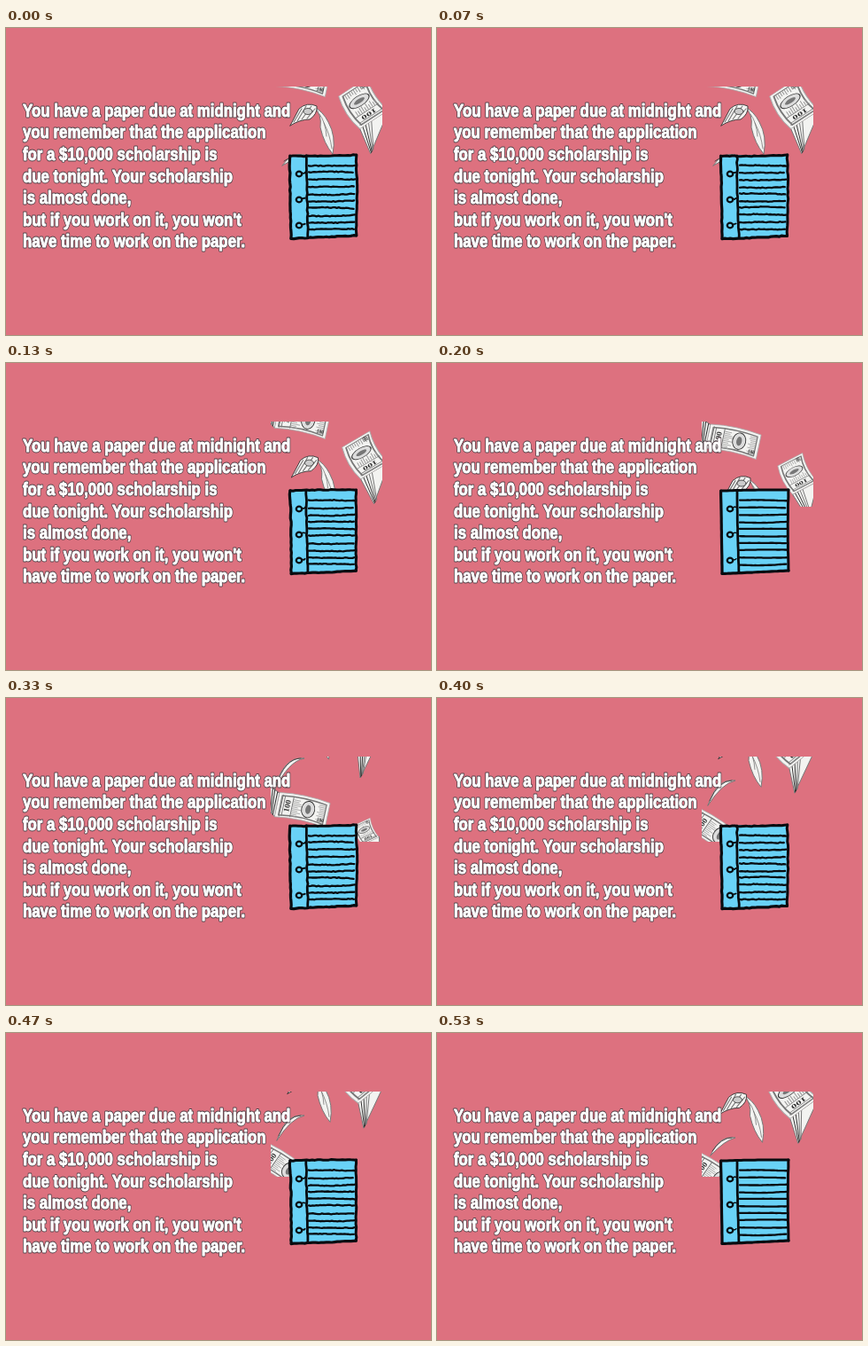
Recreate the animation shown at these times as an HTML page with a canvas. Size 480 by 346 pixels, loop 590 ms.

```html
<!DOCTYPE html>
<html lang="en">
<head>
<meta charset="utf-8">
<title>Paper or scholarship</title>
<style>
  html, body { margin: 0; width: 100%; height: 100%; overflow: hidden; background: #dd717f; }
  canvas { display: block; }
</style>
</head>
<body>
<canvas id="stage" width="480" height="346"></canvas>
<script>
const ctx = document.getElementById('stage').getContext('2d');
const LOOP = 590;
const POSE_STARTS = Array.from({ length: 9 }, (_, i) => Math.round(i * 20 / 3) * 10);
const FALL_STEPS = 6;       // the money moves on two of every three poses
const NOTEBOOK_CYCLE = 5;   // the notebook is redrawn on every pose
const INK = '#333', GREY = '#777', WHITE = '#f3f3f1';

const LINES = [
  'You have a paper due at midnight and',
  'you remember that the application',
  'for a $10,000 scholarship is',
  'due tonight. Your scholarship',
  'is almost done,',
  "but if you work on it, you won't",
  'have time to work on the paper.'
];

const clamp = v => Math.min(1, Math.max(0, v));
const random = seed => {
  const v = Math.sin(seed * 12.9898) * 43758.5453;
  return v - Math.floor(v);
};
const jitter = seed => random(seed) * 2 - 1;

function shape(path, fill, stroke, width = 1) {
  const p = new Path2D(path);
  if (fill) { ctx.fillStyle = fill; ctx.fill(p); }
  if (stroke) { ctx.strokeStyle = stroke; ctx.lineWidth = width; ctx.stroke(p); }
}

function oval(x, y, rx, ry, fill, stroke, width = 1) {
  ctx.beginPath();
  ctx.ellipse(x, y, rx, ry, 0, 0, Math.PI * 2);
  if (fill) { ctx.fillStyle = fill; ctx.fill(); }
  if (stroke) { ctx.strokeStyle = stroke; ctx.lineWidth = width; ctx.stroke(); }
}

function numeral(x, y, size, angle) {
  ctx.save();
  ctx.translate(x, y);
  ctx.rotate(angle);
  ctx.font = `bold ${size}px "Liberation Serif", serif`;
  ctx.textAlign = 'center';
  ctx.textBaseline = 'middle';
  ctx.fillStyle = INK;
  ctx.fillText('100', 0, 0);
  ctx.restore();
}

// A banknote, 66 by 30, with its origin at the top left corner.
function note() {
  const outline = 'M0 0Q33 -5 66 0V30Q33 25 0 30Z';
  ctx.save();
  shape(outline, WHITE, '#aaa', .8);
  ctx.clip(new Path2D(outline));
  shape('M4 3Q33 -1 62 3V27Q33 22 4 27Z', null, GREY, 1.5);
  for (let y = 5; y < 26; y += 2.2) {
    shape(`M20 ${y}H${26 + random(y) * 5}M${52 + random(y) * 3} ${y}H61`, null, '#999', .8);
  }
  shape('M5 2V28M8 3V27M19 2V26', null, GREY, 1.1);
  numeral(13.5, 14, 10, -Math.PI / 2);
  oval(40, 13, 8.5, 10, '#ddd', INK);
  oval(40, 13, 3.5, 5.5, GREY);
  numeral(58, 23, 6, 0);
  ctx.restore();
}

// Falls flat, then rolls over sideways behind the notebook.
function leftNote(step) {
  const roll = clamp(step - 3);
  ctx.save();
  ctx.translate(335 - 21 * roll, 110 + 56 * Math.tanh((step - 2.6) * .7));
  ctx.rotate(.21 + .4 * roll);
  ctx.scale(.88, .93);
  ctx.translate(-33, -14);
  shape('M0 1L-14 -5L-9 24L0 30Z', WHITE, GREY);
  shape('M-10 -3L-7 24M-7 -2L-5 26M-3 0V28', null, INK, 1.2);
  note();
  ctx.restore();
}

// Half a note with a folded end; it turns edge-on as it lands.
function rightNote(step) {
  const x = 397 + step * .9, y = 62 + step * 17.2;
  const angle = -2.3 + step * .05;
  const turn = Math.sqrt(clamp(1 - (step / 6.5) ** 4));
  const farX = x - Math.sin(angle) * 40 * turn, farY = y + Math.cos(angle) * 40 * turn;
  const tipX = x + 3 + step * 3, tipY = y + 28;
  shape(`M${x} ${y}L${tipX} ${tipY}L${farX} ${farY}Z`, WHITE, GREY);
  for (let k = .1; k < .5; k += .1) {
    const fromX = x + (farX - x) * k, fromY = y + (farY - y) * k;
    shape(`M${fromX} ${fromY}L${tipX + k * 8} ${tipY - k * 12}`, null, k < .25 ? INK : GREY);
  }
  ctx.save();
  ctx.translate(x, y);
  ctx.rotate(angle);
  ctx.scale(.68 * turn, 1.3 * turn);
  note();
  ctx.restore();
}

function foldedNote(step) {
  const k = step - 3;
  ctx.save();
  ctx.translate(1.5 * k - 2, 18 * k + .7 * k ** 3);
  shape('M350 89Q359 97 357 112Q361 130 371 142Q375 122 366 106Q360 94 350 89Z', WHITE, GREY);
  shape('M361 107Q368 120 370 136M356 97Q363 106 364 122', null, GREY, .8);
  shape('M323 110L333 91Q342 83 353 88Q354 97 345 103Q334 103 323 110Z', WHITE, INK, .9);
  shape('M327 106L336 91M331 105L341 88M336 103L347 88M342 102L351 91', null, GREY, 1.1);
  oval(343, 94, 5, 3.5, '#ccc', INK, .8);
  ctx.restore();
}

function curl(step) {
  const x = 303 + step * 3, y = 104 + step * 17, endY = 68 + step * 25;
  shape(`M${x} ${y}Q${x + 10} ${endY - 3} 337 ${endY}Q${x + 16} ${endY + 3} ${x} ${y}Z`, WHITE, GREY);
  shape(`M${x + 2} ${y - 5}Q${x + 12} ${endY} 333 ${endY}`, null, INK, .8);
}

// A hand-drawn stroke: one random bow plus fine grain.
function inkLine(x1, y1, x2, y2, width, grain, seed) {
  const length = Math.hypot(x2 - x1, y2 - y1), steps = 24;
  const normalX = (y1 - y2) / length, normalY = (x2 - x1) / length;
  ctx.beginPath();
  for (let i = 0; i <= steps; i++) {
    const k = i / steps;
    const off = jitter(seed) * Math.sin(k * Math.PI) + grain * jitter(seed + i * 7);
    ctx.lineTo(x1 + (x2 - x1) * k + normalX * off, y1 + (y2 - y1) * k + normalY * off);
  }
  ctx.lineWidth = width;
  ctx.stroke();
}

function notebook(drawing) {
  const smooth = drawing === 3;
  const right = smooth ? 397 : 395.5, grain = smooth ? .1 : .45;
  let seed = drawing * 100 + 1;
  const line = (x1, y1, x2, y2, width) => inkLine(x1, y1, x2, y2, width, grain, seed++);

  shape(`M321 143H${right}V235L322 237Z`, '#69d2f7');
  ctx.strokeStyle = '#080c10';
  ctx.lineCap = ctx.lineJoin = 'round';
  line(321, 144, right, 143, 3);
  line(right, 143, right, 234, 3);
  line(right, 234, 322, 237.5, 3.2);
  line(322, 237, 320.5, 144, 3.2);
  line(339, 144, 341, 236, 2.8);
  for (let i = 0; i < 10; i++) {
    const y = 155 + i * 8;
    line(342, y + jitter(seed) * .6, right - 1 - random(i) * 3, y + jitter(seed + 50) * .6, 2.3);
  }
  for (let i = 0; i < 3; i++) {
    const y = 164.5 + i * 29;
    oval(331, y, 3.2, 2.8, null, '#080c10', 2.3);
    line(334, y - 1, 338, y - 2, 1.3);
  }
}

function caption() {
  ctx.save();
  ctx.translate(19, 99.7);
  ctx.scale(.82, 1); // condensed poster lettering
  ctx.font = 'bold 20.5px "Liberation Sans", Arial, sans-serif';
  ctx.lineJoin = 'round';
  LINES.forEach((text, i) => {
    const y = i * 24.6;
    ctx.strokeStyle = '#54434a';
    ctx.lineWidth = 2.8;
    ctx.strokeText(text, 0, y);
    ctx.strokeStyle = ctx.fillStyle = '#fff';
    ctx.lineWidth = 1;
    ctx.fillText(text, 0, y);
    ctx.strokeText(text, 0, y);
  });
  ctx.restore();
}

function money(step) {
  // These falls straddle the loop: the old ones land as new ones enter.
  const age = (step + 3) % FALL_STEPS;
  const ages = [age, age + FALL_STEPS];
  ctx.save();
  ctx.beginPath();
  ctx.rect(299, 66, 126, 96);
  ctx.clip();
  ages.forEach(curl);
  ages.forEach(foldedNote);
  leftNote(step);
  ages.forEach(rightNote);
  ctx.restore();
}

function render(now) {
  const time = now % LOOP;
  const pose = POSE_STARTS.filter(start => start <= time).length - 1;
  ctx.fillStyle = '#dd717f';
  ctx.fillRect(0, 0, 480, 346);
  money(Math.floor(pose * 2 / 3));
  notebook(pose % NOTEBOOK_CYCLE);
  caption();
}

function tick() {
  render(performance.now());
  requestAnimationFrame(tick);
}
tick();
</script>
</body>
</html>
```
